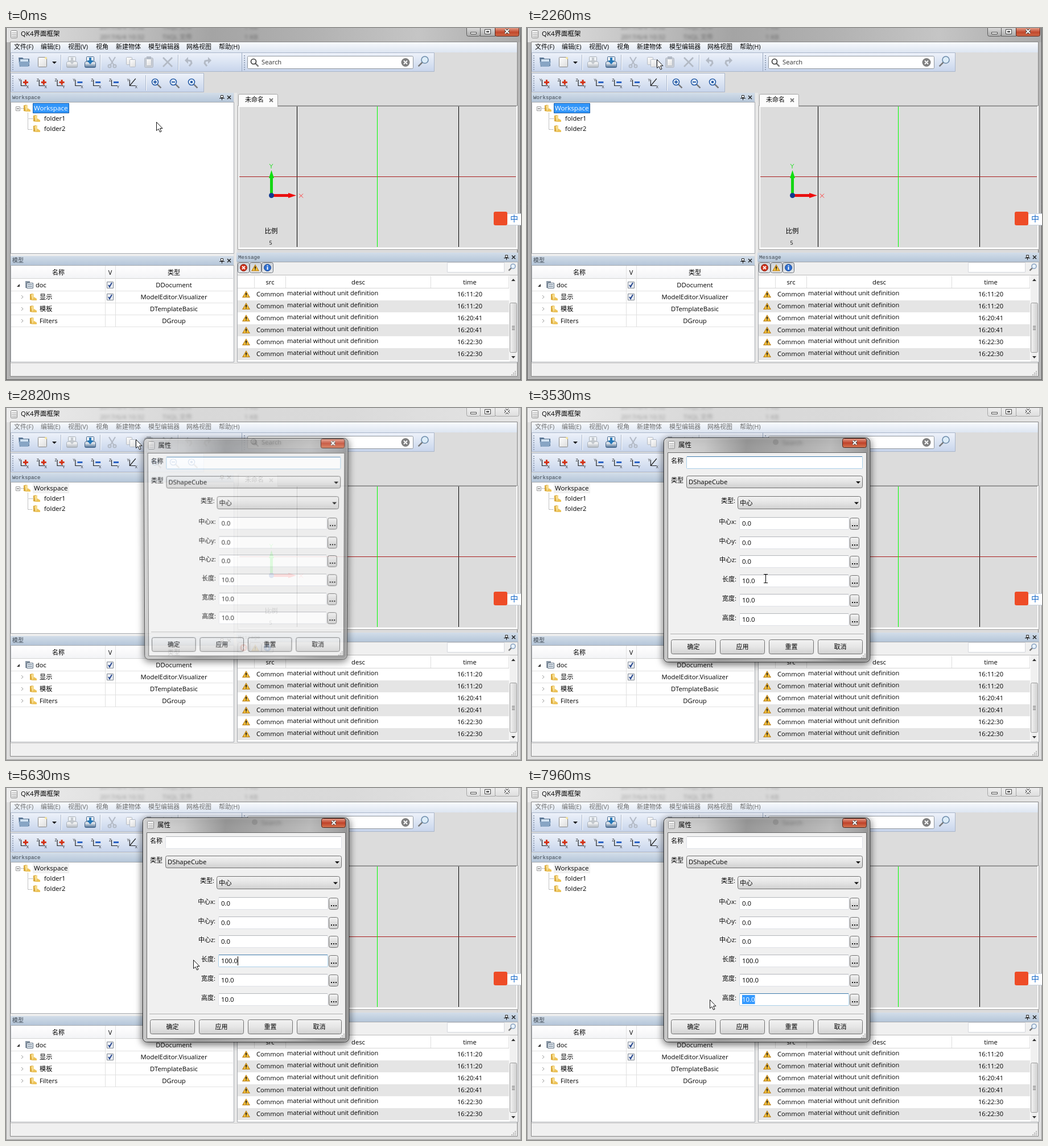
An HTML page with a canvas that plays this animation: 905 by 619 pixels, repeating every 8000 ms.

```html
<!DOCTYPE html>
<html lang="zh-CN">
<head>
<meta charset="utf-8">
<style>
html, body { margin: 0; width: 100%; height: 100%; overflow: hidden; background: #ddd; }
canvas { position: absolute; left: 0; top: 0; }
</style>
</head>
<body>
<script>
const W = 905, H = 619, LOOP = 8000;
const SANS = '"Open Sans","Noto Sans CJK SC","Noto Sans CJK JP",sans-serif';
const MONO = '"Liberation Mono","Noto Sans CJK SC","Noto Sans CJK JP",monospace';

function layer() {
  const el = document.createElement('canvas');
  el.width = W; el.height = H;
  document.body.append(el);
  return el.getContext('2d');
}
const base = layer(), dialog = layer(), top2d = layer();
dialog.canvas.style.transformOrigin = '421.5px 249.5px';
let c = base;

// drawing helpers
function grad(x0, y0, x1, y1, ...cols) {
  const g = c.createLinearGradient(x0, y0, x1, y1);
  cols.forEach((col, i) => g.addColorStop(i / (cols.length - 1), col));
  return g;
}
const vgrad = (y, h, ...cols) => grad(0, y, 0, y + h, ...cols);
function box(x, y, w, h, fill, stroke, r = 0) {
  c.beginPath();
  if (stroke) c.roundRect(x + .5, y + .5, w - 1, h - 1, r); else c.roundRect(x, y, w, h, r);
  if (fill) { c.fillStyle = fill; c.fill(); }
  if (stroke) { c.strokeStyle = stroke; c.lineWidth = 1; c.stroke(); }
}
function trace(pts) {
  c.beginPath();
  for (let i = 0; i < pts.length; i += 2) c.lineTo(pts[i], pts[i + 1]);
}
function line(color, width, ...pts) {
  trace(pts); c.strokeStyle = color; c.lineWidth = width; c.stroke();
}
function poly(fill, ...pts) { trace(pts); c.fillStyle = fill; c.fill(); }
function disc(x, y, r, fill, stroke, width = 1) {
  c.beginPath(); c.arc(x, y, r, 0, 7);
  if (fill) { c.fillStyle = fill; c.fill(); }
  if (stroke) { c.strokeStyle = stroke; c.lineWidth = width; c.stroke(); }
}
function text(s, x, y, color = '#000', size = 11.2, align = 'left', family = SANS) {
  c.font = size + 'px ' + family;
  c.textAlign = align; c.fillStyle = color;
  c.fillText(s, x, y + 4);
}
function smudge(s, x, y, color) {
  c.filter = 'blur(2px)'; text(s, x, y, color); c.filter = 'none';
}
const cross = (x, y, r, color, w) => {
  line(color, w, x - r, y - r, x + r, y + r); line(color, w, x + r, y - r, x - r, y + r);
};

// small icons
function folder(x, y) {
  poly('#d9a93c', x, y - 5, x + 5, y - 6, x + 6, y + 6, x, y + 5);
  poly('#f7dc8c', x + 2, y - 4, x + 7, y - 6, x + 7, y + 5, x + 4, y + 6);
  poly('#edc35a', x + 7, y, x + 12, y + 3, x + 12, y + 6, x + 4, y + 6);
}
function page(x, y, w, h, edge = '#888') {
  box(x, y, w, h, grad(x, y, x + w, y + h, '#fff', '#dcdcdc'), edge, 1);
}
function lens(x, y, r, color, fill, dir = 1) {
  line('#777', 2.4, x + dir * r * .7, y + r * .7, x + dir * r * 1.9, y + r * 1.9);
  disc(x, y, r, fill, color, 1.6);
}
function warning(x, y) {
  poly('#b97d14', x, y - 6, x + 7, y + 6, x - 7, y + 6);
  poly('#f8c33c', x, y - 4, x + 5, y + 5, x - 5, y + 5);
  box(x - 1, y - 2, 2, 4, '#222'); box(x - 1, y + 3, 2, 1, '#222');
}
function disk(x, y, main, arrow) {
  box(x - 10, y - 1, 20, 11, vgrad(y, 10, '#fff', main), main, 2);
  box(x - 7, y - 10, 14, 10, '#eef2f6', main, 1);
  poly(arrow, x - 2, y - 8, x + 2, y - 8, x + 2, y - 3, x + 6, y - 3, x, y + 4, x - 6, y - 3, x - 2, y - 3);
}
function down(x, y) { poly('#111', x - 4, y - 2, x + 4, y - 2, x, y + 2); }
function separator(x, y) { line('#a9b6cb', 1, x + .5, y, x + .5, y + 27); line('#fff', 1, x + 1.5, y, x + 1.5, y + 27); }
function grip(x, y) { for (let i = 0; i < 7; i++) box(x, y + i * 4, 2, 2, '#98a5ba'); }

function toolbar(y, w) {
  box(8, y, w, 34, vgrad(y, 34, '#eef2fa', '#dbe4f3', '#c7d4eb'), '#aab6ca');
  grip(11, y + 5);
}
function axisIcon(x, y, up, right, sign) {
  line('#222', 1.2, x - 5.5, y - 5, x - 5.5, y + 5.5, x + 5, y + 5.5);
  text(up, x - 10, y - 6, '#222', 7); text(right, x + 4, y + 6, '#222', 7);
  if (!sign) return line('#222', 1.2, x - 5, y + 5, x + 5, y - 7);
  const col = sign === '+' ? '#d33416' : '#2a62c4';
  box(x - 2, y - 2, 9, 3, col);
  if (sign === '+') box(x + 1, y - 5, 3, 9, col);
}

function dock(x, y, w, label) {
  box(x, y, w, 16, vgrad(y, 16, '#d2dde9', '#b5c6d9'));
  text(label, x + 3, y + 7, '#3c4650', label.length > 2 ? 9.2 : 10, 'left', MONO);
  const px = x + w - 21, py = y + 8;
  box(px - 2, py - 4, 5, 5, '#fff', '#222'); line('#222', 1, px - 4, py + 1.5, px + 5, py + 1.5);
  line('#222', 1, px + .5, py + 1, px + .5, py + 5);
  cross(x + w - 8, y + 8, 3, '#222', 1.4);
}

function titleBar(active) {
  box(0, 0, W, H, active ? '#b4b4b4' : '#dedede');
  box(0, 0, W, 25, active ? grad(0, 0, W, 0, '#e3e3e3', '#c6c6c6', '#a4a4a4', '#b2b2b2', '#c5c5c5', '#a9a9a9')
                          : grad(0, 0, W, 0, '#ededed', '#d8d8d8', '#dadada', '#e4e4e4'));
  const ink = active ? '#666' : '#9a9a9a';
  for (const y of [-2, 16]) {
    smudge('2017/6/4 10:32', 165, y, ink); smudge('TXQL 文件', 275, y, ink); smudge('1 KB', 419, y, ink);
  }
  page(8, 4, 12, 14);
  for (let i = 0; i < 3; i++) line('#aaa', 1, 10, 8.5 + i * 3, 18, 8.5 + i * 3);
  text('QK4界面框架', 26, 10, '#000', 11.5);
  const edge = active ? '#5c5c5c' : '#a5a5a5', face = vgrad(0, 15, active ? '#d8d8d8' : '#eee', active ? '#a8a8a8' : '#ddd');
  box(809, -4, 25, 19, face, edge, 3); box(833, -4, 27, 19, face, edge);
  box(859, -4, 43, 19, active ? vgrad(0, 15, '#e29a85', '#c2492d', '#cf6a48') : face, active ? '#5a2a22' : edge, 3);
  box(816, 7, 11, 4, '#fff', '#444'); box(841, 2, 11, 9, '#fff', '#444'); box(844, 5, 5, 3, '#888', '#444');
  cross(880.5, 6, 3.5, '#444', 4); cross(880.5, 6, 3.5, '#fff', 2);
  line(active ? '#555' : '#999', 1, .5, 0, .5, 618.5, 904.5, 618.5, 904.5, 0);
}

function topBars(active, hover) {
  box(8, 25, 890, 18, vgrad(25, 18, '#f8fafd', '#dde5f1'));
  if (hover) box(188, 25, 54, 17, '#d6d9df', '#7c8694', 1);
  const labels = ['文件(F)', '编辑(E)', '视图(V)', '视角', '新建物体', '模型编辑器', '网格视图', '帮助(H)'];
  [14, 61, 109, 158, 193, 250, 317, 374].forEach((x, i) => text(labels[i], x, 33, active ? '#000' : '#6d6d6d', 11));

  toolbar(43, 745); toolbar(79, 340);
  poly('#5c7896', 22, 52, 29, 52, 31, 54, 41, 54, 41, 67, 24, 68);
  poly('#cfe0f0', 25, 55, 39, 55, 39, 62, 25, 62);
  poly('#88a5c4', 22, 59, 42, 59, 39, 68, 25, 68);
  page(56, 51, 16, 18); down(85, 61); disc(70, 53, 2, '#fbe9a0');
  separator(96, 47); disk(116, 60, '#a9b0b8', '#c3c8cd'); disk(148, 60, '#3f6289', '#2678b8');
  separator(165, 47);
  const dim = '#b3bac5';
  line(dim, 2, 181, 51, 190, 66); line(dim, 2, 192, 51, 183, 66); disc(182, 67, 2.5, null, dim, 2); disc(191, 67, 2.5, null, dim, 2);
  page(211, 51, 11, 14, dim); page(217, 55, 11, 14, dim);
  box(243, 52, 16, 18, '#c9ced6', dim, 2); page(246, 54, 10, 13, dim); box(247, 50, 8, 4, dim);
  cross(284, 60, 8, dim, 2.6); separator(302, 47);
  for (const [x, d] of [[321, 1], [354, -1]]) {
    poly(dim, x - 7 * d, 57, x - d, 51, x - d, 63);
    line(dim, 3, x - d, 57, x + 4 * d, 58, x + 5 * d, 62, x + d, 67);
  }
  line('#9cabc2', 1, 414.5, 43, 414.5, 76); grip(418, 48);
  box(424, 49, 292, 23, '#fff', '#8f959d', 2);
  lens(435, 59, 4.5, '#333', null); text('Search', 449, 60, '#333', 11.2);
  disc(702, 60.5, 7.5, '#808080'); cross(702, 60.5, 3, '#fff', 1.8);
  lens(736, 56, 6, '#6d8caa', '#dcecf8', -1);

  ['YX+', 'ZX+', 'ZY+', 'YX-', 'ZX-', 'ZY-', 'YX'].forEach((k, i) => axisIcon(32 + i * 31.8, 96, k[0], k[1], k[2]));
  separator(245, 83);
  ['+', '-', 'o'].forEach((k, i) => {
    const x = 262 + i * 32;
    lens(x, 95, 5.5, '#2b5fa8', '#e8f1fc');
    if (k === 'o') return box(x - 2, 93, 4, 4, '#2b5fa8');
    box(x - 3, 94, 6, 2, '#2b5fa8');
    if (k === '+') box(x - 1, 92, 2, 6, '#2b5fa8');
  });
}

function workspace(active) {
  dock(8, 114, 392, 'Workspace');
  box(8, 130, 393, 267, '#fff', '#a5a9ae');
  c.setLineDash([1, 1]);
  line('#888', 1, 38.5, 149, 38.5, 178.5, 47, 178.5); line('#888', 1, 38, 159.5, 47, 159.5); line('#888', 1, 26, 141.5, 31, 141.5);
  c.setLineDash([]);
  box(17, 138, 8, 8, '#fff', '#999'); line('#333', 1, 19, 142, 23, 142);
  box(47, 132, 64, 18, active ? '#3296fa' : '#f0f0f0', active ? '#1b5faa' : null);
  text('Workspace', 49, 141, active ? '#fff' : '#000', 11.6);
  folder(31, 141); folder(48, 159); folder(48, 177);
  text('folder1', 67, 159); text('folder2', 67, 177);
}

function modelDock() {
  dock(8, 401, 392, '模型');
  box(8, 417, 393, 171, '#fff', '#a5a9ae');
  box(9, 418, 391, 22, vgrad(418, 22, '#fff', '#f3f4f6')); line('#d5d5d5', 1, 9, 440.5, 399, 440.5);
  text('名称', 92, 430, '#000', 11, 'center'); text('V', 183, 430, '#000', 11, 'center'); text('类型', 295, 430, '#000', 11, 'center');
  const names = ['doc', '显示', '模板', 'Filters'], types = ['DDocument', 'ModelEditor.Visualizer', 'DTemplateBasic', 'DGroup'];
  names.forEach((name, i) => {
    const y = 452 + i * 21;
    line('#e2e2e2', 1, 9, y + 10.5, 399, y + 10.5);
    text(name, i ? 59 : 52, y, '#000', 11.2); text(types[i], 295, y, '#000', 11.3, 'center');
    if (i) { folder(42, y); line('#999', 1, 27, y - 3, 30, y, 27, y + 3); }
    else {
      poly('#333', 19, y + 3, 24, y + 3, 24, y - 2);
      box(34, y - 7, 8, 12, '#8a97a5'); box(36, y - 4, 12, 10, '#e6edf4', '#5f6f80');
      line('#5f6f80', 1, 38, y - .5, 46, y - .5); line('#5f6f80', 1, 38, y + 2.5, 46, y + 2.5);
    }
    if (i < 2) { box(177, y - 6, 12, 12, '#eef1f6', '#7f8790'); line('#25458c', 2, 180, y, 182, y + 3, 186, y - 4); }
  });
  for (const x of [174.5, 192.5]) line('#e0e0e0', 1, x, 418, x, 525);
}

function view() {
  box(407, 136, 493, 254, '#fff', '#a0a0a0'); box(410, 138, 487, 248, '#dcdcdc');
  line('#888', 1, 410, 137.5, 897, 137.5);
  box(408, 116, 70, 22, '#fcfcfc', '#a5a5a5', 2); box(409, 135, 68, 4, '#fcfcfc');
  text('未命名', 420, 126, '#000', 11); cross(466, 127, 3, '#777', 1.8);
  line('#000', 1, 511.5, 138, 511.5, 385); line('#000', 1, 795.5, 138, 795.5, 385);
  line('#a81c1c', 1, 410, 261.5, 896, 261.5); line('#0f0', 1, 652.5, 138, 652.5, 385);
  box(464, 261, 5, 32, '#14d614'); poly('#0fe00f', 466.5, 250, 471, 264, 462, 264);
  box(469, 292, 28, 5, '#e81010'); poly('#f00a0a', 510, 294.5, 496, 290, 496, 299);
  disc(466.5, 294.5, 4.5, '#123a90');
  cross(518.5, 295, 3.5, '#ff3a3a', 1);
  line('#20e020', 1, 463, 239, 466, 243, 469, 239); line('#20e020', 1, 466, 243, 466, 247);
  text('比例', 466, 357, '#000', 11.5, 'center'); text('5', 465, 377, '#000', 9, 'center');
}

function messageDock() {
  dock(405, 395, 495, 'Message');
  box(406, 411, 494, 177, '#f0f0f0', '#a5a9ae');
  for (let i = 0; i < 3; i++) box(407 + i * 21, 412, 21, 19, vgrad(412, 19, '#cfd3d8', '#e6e8eb'), '#70757c', 3);
  disc(417.5, 421.5, 6, '#d0331c', '#8a1f10'); cross(417.5, 421.5, 2.5, '#fff', 1.8);
  warning(438, 421.5);
  disc(459.5, 421.5, 6, '#2f6fd0', '#1a4690'); box(458.5, 420, 2, 5, '#fff'); box(458.5, 417.5, 2, 1.5, '#fff');
  box(775, 412, 101, 18, '#fff', '#d5d8de'); lens(891, 419, 4, '#8ba4c2', '#e8f2fb', -1);
  box(407, 435, 492, 152, '#fff'); line('#bbb', 1, 407, 434.5, 899, 434.5);
  text('src', 464, 447, '#000', 11.2, 'center'); text('desc', 619, 447, '#000', 11.2, 'center'); text('time', 815, 447, '#000', 11.2, 'center');
  line('#d5d5d5', 1, 407, 457.5, 884, 457.5);
  for (const x of [436.5, 491.5, 746.5, 883.5]) line('#dedede', 1, x, 436, x, 457);
  ['16:11:20', '16:20:41', '16:22:30'].flatMap(s => [s, s]).forEach((time, i) => {
    const y = 468 + i * 21;
    if (i % 2) box(407, y - 10, 477, 21, '#e5e5e5');
    warning(422, y); text('Common', 440, y); text('material without unit definition', 494, y - 2, '#000', 11.05);
    text(time, 815, y, '#000', 11.1, 'center');
  });
  box(885, 435, 13, 152, '#f0f0f0');
  box(885, 483, 13, 88, grad(885, 0, 898, 0, '#f4f4f4', '#cfcfcf'), '#999', 2);
  for (let i = 0; i < 3; i++) line('#666', 1, 889, 524.5 + i * 3, 894, 524.5 + i * 3);
  poly('#333', 888, 445, 895, 445, 891.5, 441); poly('#333', 888, 577, 895, 577, 891.5, 581);
}

function menu(alpha, selected) {
  c.globalAlpha = alpha;
  box(191, 47, 145, 204, 'rgba(0,0,0,.3)');
  box(188, 42, 145, 206, '#f1f1f1', '#8e8e8e');
  line('#dcdcdc', 1, 213.5, 44, 213.5, 246);
  if (selected) box(190, 45, 141, 20, vgrad(45, 20, '#eef4fb', '#d5e5f6'), '#aaccee', 2);
  ['立方体', '柱体', '球体', '圆台', '拉伸体', '实心旋转体', '空洞旋转体', '扫描体', 'Torus', '天线罩 ..'].forEach((s, i) => {
    const y = 55 + i * 20, x = 200;
    text('创建' + s, 219, y, '#000', 11);
    if (i === 0) { poly('#888', x, y - 5, x + 5, y - 3, x + 5, y + 3, x, y + 6, x - 5, y + 3, x - 5, y - 3); poly('#bbb', x, y - 5, x + 5, y - 3, x, y, x - 5, y - 3); }
    if (i === 1 || i === 6) { box(x - 4, y - 5, 8, 11, grad(x - 4, 0, x + 4, 0, '#444', '#aaa', '#555'), null, 2); if (i === 1) box(x - 4, y - 5, 8, 4, '#ccc', null, 2); }
    if (i === 2) disc(x, y, 5, vgrad(y - 5, 10, '#ddd', '#444'));
    if (i === 3) poly(grad(x - 5, 0, x + 5, 0, '#ddd', '#555'), x - 1, y - 5, x + 1, y - 5, x + 5, y + 5, x - 5, y + 5);
    if (i === 4) { poly('#e39a28', x - 5, y - 5, x + 6, y - 1, x - 1, y + 3); box(x - 5, y, 5, 4, '#888'); }
    if (i === 5) line('#666', 2, x - 4, y + 5, x - 2, y - 4, x + 2, y - 4, x + 4, y + 5);
    if (i === 7) line('#777', 2.5, x - 6, y + 1, x - 2, y - 2, x + 3, y - 1, x + 5, y + 4);
    if (i === 8) disc(x, y, 4, null, '#777', 3.5);
    if (i === 9) { line('#666', 1.4, x - 5, y - 4, x + 2, y + 5, x + 4, y - 3); disc(x + 2, y - 2, 2.5, null, '#28a745', 1.6); }
  });
  poly('#000', 318, 231, 322, 235, 318, 239);
  c.globalAlpha = 1;
}

function drawBase(s) {
  c = base;
  titleBar(s.active);
  box(7, 24, 892, 589, '#dcdcdc', '#858585');
  topBars(s.active, s.hover);
  box(8, 397, 392, 4, '#eee'); box(401, 114, 5, 475, '#e8e8e8');
  workspace(s.active); modelDock(); view(); messageDock();
  box(8, 588, 890, 24, '#f0f0f0'); line('#c8c8c8', 1, 8, 589.5, 898, 589.5);
  for (let i = 0; i < 3; i++) for (let j = 0; j <= i; j++) box(888 + i * 3, 609 - j * 3, 2, 2, '#b5b5b5');
  box(872, 326, 40, 21, '#fff', '#c9d3e0', 4); text('中', 886, 336, '#1768c8', 14);
  box(857, 323, 24, 24, '#ee4c27', null, 3);
  if (s.menu > 0) menu(s.menu, s.item);
}

// dialog
const ROWS = ['中心x:', '中心y:', '中心z:', '长度:', '宽度:', '高度:'];
const rowY = i => 203 + i * 33.7;

function edit(x, y, w, focus) {
  box(x, y, w, 22, '#fff', focus ? '#a9cfe8' : '#dfe1e7', 1);
  line(focus ? '#3d7bad' : '#b4b6bb', 1, x + 1, y + .5, x + w - 1, y + .5);
}
function combo(x, y, w, h, s, hot) {
  box(x, y, w, h, hot ? vgrad(y, h, '#eaf6fd', '#bee6fd', '#a7d9f5') : vgrad(y, h, '#f3f3f3', '#e4e4e4', '#cfcfcf'), hot ? '#3c7fb1' : '#707070', 3);
  text(s, x + 4, y + h / 2, '#000', 11.3); down(x + w - 8, y + h / 2 + 1);
}
function drawDialog(s) {
  c = dialog;
  c.clearRect(0, 0, W, H);
  c.shadowColor = 'rgba(0,0,0,.65)'; c.shadowBlur = 14; c.shadowOffsetY = 3;
  box(240, 52, 363, 395, grad(240, 52, 603, 100, '#dadada', '#c9c9c9', '#999', '#aaa', '#bdbdbd', '#989898'), '#2b2b2b', 7);
  c.shadowColor = 'transparent';
  smudge('Search', 449, 61, '#777'); disc(437, 60, 5, 'rgba(90,90,90,.25)');
  box(241, 53, 361, 393, null, 'rgba(255,255,255,.6)', 6);
  box(247, 78, 350, 363, '#f0f0f0', '#6a6a6a');
  page(248, 58, 12, 14); for (let i = 0; i < 3; i++) line('#aaa', 1, 250, 62.5 + i * 3, 258, 62.5 + i * 3);
  text('属性', 266, 65, '#000', 11.5);
  box(554, 53, 43, 17, vgrad(53, 17, '#e5a290', '#c0432a', '#d77b55'), '#4d241d', 3);
  cross(576, 61, 3.2, '#444', 4); cross(576, 61, 3.2, '#fff', 2);
  text('名称', 253, 93, '#000', 11); edit(280, 85, 310, s.focus === -1);
  text('类型', 253, 127, '#000', 11); combo(280, 119, 310, 22, 'DShapeCube', s.hot === 1);
  text('类型:', 366, 163, '#000', 11, 'right'); combo(370, 155, 217, 23, '中心', s.hot === 2);
  const values = ['0.0', '0.0', '0.0', s.len, s.wid, '10.0'];
  ROWS.forEach((label, i) => {
    const y = Math.round(rowY(i)), on = s.focus === i;
    text(label, 368, y - 3, '#000', 11, 'right');
    edit(373, y - 11, 193, on);
    c.font = '11.4px ' + SANS;
    const w = c.measureText(values[i]).width;
    if (on && s.sel) box(378, y - 8, w, 16, '#3399ff');
    text(values[i], 378, y, on && s.sel ? '#fff' : '#000', 11.4);
    if (on && !s.sel) box(Math.round(378 + w), y - 8, 1, 16, '#000');
    box(567, y - 10, 17, 21, vgrad(y - 10, 21, '#f4f4f4', '#ddd', '#d0d0d0'), '#707070', 3);
    for (let k = 0; k < 3; k++) box(571 + k * 4, y + 3, 2, 2, '#111');
  });
  line('#a5a5a5', 1, 252, 397.5, 592, 397.5); line('#fff', 1, 252, 398.5, 592, 398.5);
  ['确定', '应用', '重置', '取消'].forEach((s, i) => {
    box(253 + i * 86, 407, 79, 26, vgrad(407, 26, '#f3f3f3', '#e6e6e6', '#d0d0d0'), '#707070', 3);
    text(s, 292.5 + i * 86, 420, '#000', 11, 'center');
  });
  for (let i = 0; i < 3; i++) for (let j = 0; j <= i; j++) box(587 + i * 3, 438 - j * 3, 2, 2, '#b5b5b5');
}

// motion: pointer stops as [time, x, y]
const PATH = [[0, 264, 165], [460, 264, 165], [1020, 215, 35], [1560, 215, 35], [2030, 228, 55], [3130, 228, 55],
  [3530, 419, 300], [3910, 410, 304], [3990, 410, 304], [4060, 317, 297], [5550, 317, 297], [5940, 427, 338], [6020, 427, 338],
  [6180, 342, 340], [6320, 392, 355], [6400, 414, 347], [6550, 414, 347], [6720, 415, 350], [7180, 415, 350],
  [7560, 427, 369], [7790, 427, 370], [7950, 321, 372], [8000, 321, 372]];
const clamp = v => Math.max(0, Math.min(1, v));
const ramp = (t, a, b) => clamp((t - a) / (b - a));
const at = (t, steps) => steps.filter(([from]) => t >= from).pop()[1];

function pointer(t) {
  const i = Math.max(1, PATH.findIndex(p => p[0] > t)), [a, x0, y0] = PATH[i - 1], [b, x1, y1] = PATH[i];
  const k = ramp(t, a, b), e = k * k * (3 - 2 * k);
  return [Math.round(x0 + (x1 - x0) * e), Math.round(y0 + (y1 - y0) * e)];
}
const inside = (x, y, x0, y0, x1, y1) => x > x0 && x < x1 && y > y0 && y < y1;

function drawPointer(t, x, y) {
  const dragging = (t >= 3990 && t < 4230) || (t >= 6020 && t < 6240) || (t >= 7790 && t < 7940);
  const overEdit = t > 2980 && (inside(x, y, 280, 85, 590, 107) || ROWS.some((_, i) => Math.abs(y - rowY(i)) < 9 && x > 373 && x < 566));
  if (dragging || overEdit) {
    line('#000', 1, x - 3, y - 7.5, x + 4, y - 7.5); line('#000', 1, x - 3, y + 7.5, x + 4, y + 7.5);
    line('#000', 1, x + .5, y - 7, x + .5, y + 7);
    return;
  }
  const pts = [0, 0, 0, 15, 3.5, 12, 6, 17.5, 8.5, 16.5, 6, 11, 10.5, 11, 0, 0].map((v, i) => v + (i % 2 ? y : x) + .5);
  poly('#fff', ...pts); line('#111', 1, ...pts);
}

function drawTop(t, x, y) {
  c = top2d;
  c.clearRect(0, 0, W, H);
  c.globalAlpha = ramp(t, 4600, 4720) * (1 - ramp(t, 5160, 5300));
  if (c.globalAlpha) {
    box(319, 317, 37, 20, 'rgba(0,0,0,.25)', null, 2);
    box(317, 315, 37, 19, vgrad(315, 19, '#fff', '#e4e5f0'), '#767676', 2);
    text('长度:', 322, 324, '#575757', 11);
  }
  c.globalAlpha = 1;
  drawPointer(t, x, y);
}

const drawn = {};
function refresh(name, state, draw) {
  const key = JSON.stringify(state);
  if (drawn[name] !== key) { drawn[name] = key; draw(state); }
}

function frame(now) {
  const t = now % LOOP, [x, y] = pointer(t);
  refresh('base', {
    active: t < 2500, hover: t < 2260 && t > 460 && y < 43 || t > 1020 && t < 2260,
    menu: t < 2260 ? ramp(t, 1030, 1170) : 0, item: t > 1560 && y > 44
  }, drawBase);
  refresh('dialog', {
    focus: at(t, [[0, -1], [3990, 3], [6000, 4], [7790, 5]]),
    sel: (t >= 4030 && t < 4610) || (t >= 6100 && t < 6390) || t >= 7850,
    len: at(t, [[0, '10.0'], [4610, '1'], [4990, '10'], [5160, '100'], [5320, '100.'], [5470, '100.0']]),
    wid: at(t, [[0, '10.0'], [6390, '1'], [6720, '10'], [6950, '100'], [7180, '100.'], [7330, '100.0']]),
    hot: t < 2980 ? 0 : inside(x, y, 280, 119, 590, 141) ? 1 : inside(x, y, 370, 155, 587, 178) ? 2 : 0
  }, drawDialog);
  const open = ramp(t, 2580, 2860), rest = 1 - open, style = dialog.canvas.style;
  style.opacity = open;
  style.transform = rest ? `translateY(${-6 * rest}px) perspective(900px) rotateX(${-10 * rest}deg) scale(${1 - .1 * rest})` : 'none';
  drawTop(t, x, y);
  requestAnimationFrame(() => frame(performance.now()));
}
frame(performance.now());
</script>
</body>
</html>
```
